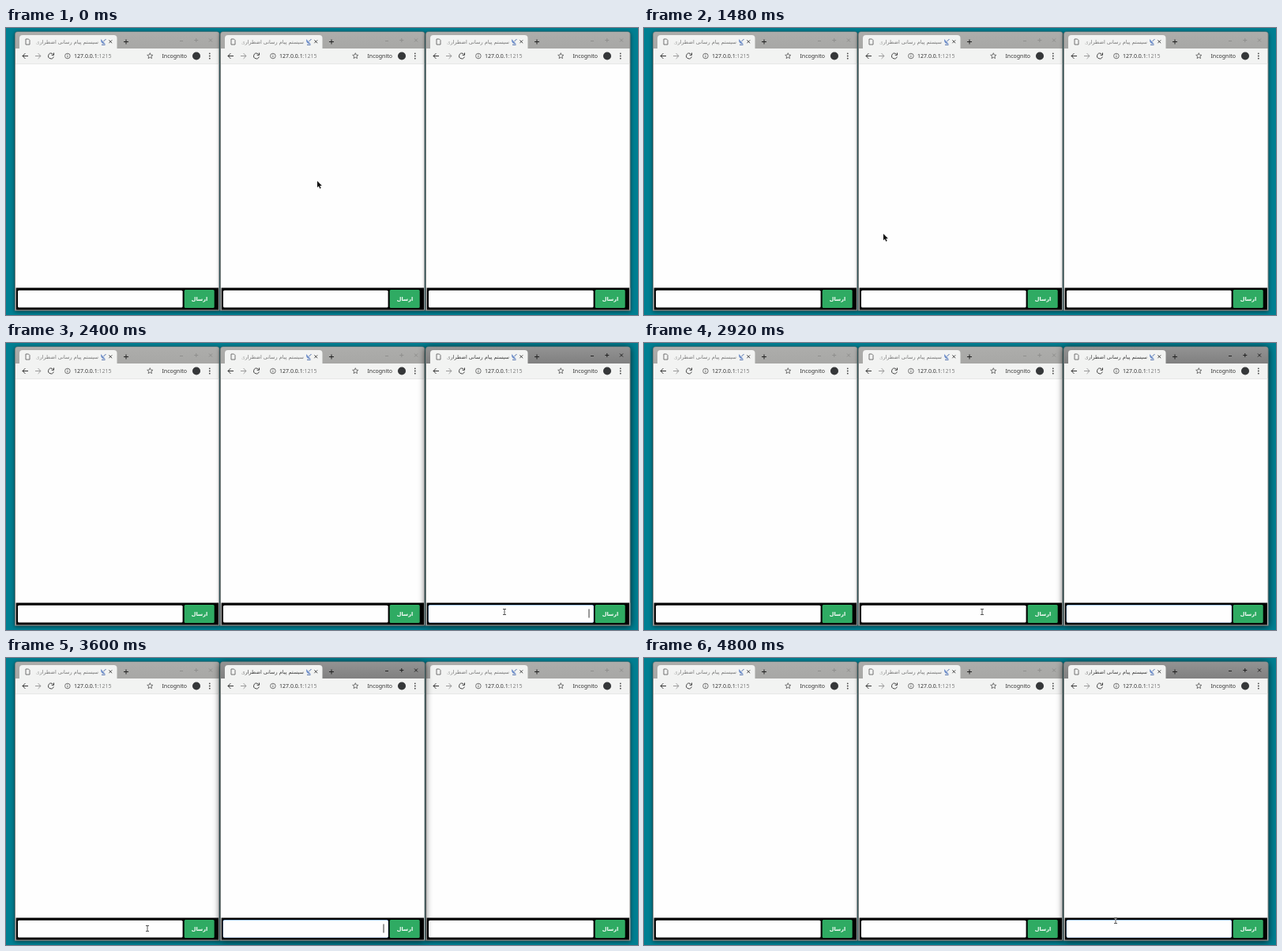
Write an HTML page with a canvas that moves like this. It is 800 by 364 pixels and loops after 5000 ms.

```html
<!DOCTYPE html>
<html lang="fa">
<head>
<meta charset="utf-8">
<style>
html, body { margin: 0; width: 100%; height: 100%; overflow: hidden; background: #007f92; }
canvas { display: block; }
</style>
</head>
<body>
<canvas id="stage" width="800" height="364"></canvas>
<script>
const c = document.getElementById('stage').getContext('2d');
const LATIN = '7px "Noto Sans", "Open Sans", sans-serif';
const PERSIAN = '6.5px "DejaVu Sans", sans-serif';
const CHROME = '#f2f3f2', INK = '#333', PAPER = '#fefefe';
const BLINK = 9;

// Key points of the pointer: step, x, y
const path = [
  [0, 394, 194], [6, 323, 224], [12, 418, 184], [19, 207, 219], [22, 303, 261],
  [27, 631, 309], [30, 631, 341], [36, 631, 341], [45, 421, 341], [48, 421, 341],
  [54, 179, 343], [57, 179, 343], [62, 597, 333], [75, 597, 333]
];
// Clicks that focus a window: step, window
const clicks = [[30, 2], [46, 1], [57, 0], [63, 2]];

function rect(x, y, w, h, fill) {
  c.fillStyle = fill;
  c.fillRect(x, y, w, h);
}

function round(x, y, w, h, r, fill) {
  c.beginPath();
  c.roundRect(x, y, w, h, r);
  c.fillStyle = fill;
  c.fill();
}

function disc(x, y, r, fill) {
  c.beginPath();
  c.arc(x, y, r, 0, 7);
  c.fillStyle = fill;
  c.fill();
}

function stroke(d, color, width = 1) {
  c.strokeStyle = color;
  c.lineWidth = width;
  c.stroke(new Path2D(d));
}

function arc(x, y, r, from, to, color) {
  c.beginPath();
  c.arc(x, y, r, from, to);
  c.strokeStyle = color;
  c.lineWidth = 0.9;
  c.stroke();
}

const plus = (x, y, r, color) =>
  stroke(`M${x - r} ${y}h${2 * r}M${x} ${y - r}v${2 * r}`, color);

const cross = (x, y, r, color) =>
  stroke(`M${x - r} ${y - r}l${2 * r} ${2 * r}m0 ${-2 * r}l${-2 * r} ${2 * r}`, color);

// Arrow pointing left (dir 1) or right (dir -1)
const arrow = (x, y, dir, color) =>
  stroke(`M${x + 7 * dir} ${y}H${x}m${3.4 * dir} -3.4L${x} ${y}l${3.4 * dir} 3.4`, color);

function star(x, y, r) {
  c.beginPath();
  for (let i = 0; i < 10; i++) {
    const a = (i / 5 - 0.5) * Math.PI, d = i % 2 ? r * 0.45 : r;
    c.lineTo(x + d * Math.cos(a), y + d * Math.sin(a));
  }
  c.closePath();
  c.strokeStyle = '#555';
  c.lineWidth = 0.8;
  c.stroke();
}

function text(s, x, y, color, font = LATIN, align = 'left') {
  c.font = font;
  c.fillStyle = color;
  c.textAlign = align;
  c.direction = font === LATIN ? 'ltr' : 'rtl';
  c.fillText(s, x, y);
}

function fade(x0, y0, x1, y1, from, to) {
  const g = c.createLinearGradient(x0, y0, x1, y1);
  g.addColorStop(0, from);
  g.addColorStop(1, to);
  return g;
}

function titleBar(active, awake) {
  const [top, bottom] = active ? ['#939393', '#808080'] : ['#adadab', '#a7a7a5'];
  rect(0, 5, 258, 21, fade(0, 5, 0, 26, top, bottom));
  round(5, 9, 123.5, 18, [4, 4, 0, 0], CHROME);
  stroke('M13 14h3.5l1.5 1.5v5.5h-5z', '#666', 0.9);

  c.save();
  c.beginPath();
  c.rect(24, 9, 82, 17);
  c.clip();
  text('سیستم پیام رسانی اضطراری', 105, 20, awake ? '#3c3c3c' : '#777', PERSIAN, 'right');
  rect(24, 10, 9, 15, fade(24, 0, 33, 0, CHROME, CHROME + '00'));
  c.restore();

  // Satellite dish
  c.fillStyle = '#6f8fca';
  c.fill(new Path2D('M108 14q-.5 6.5 6 6.5z'));
  stroke('M111.5 17l3 -3M109 21.3h4.5', '#4d6ca8');

  cross(120.3, 17.3, 1.9, '#444');
  plus(140, 17.5, 3, '#222');
  const tint = awake ? '#222' : '#8f8f8d';
  stroke('M208 16.5h4', tint);
  plus(228.8, 15.5, 2.5, tint);
  cross(247, 15.5, 2, tint);
}

function toolBar() {
  const y = 35.5;
  rect(0, 26, 258, 19, CHROME);
  rect(0, 45, 258, 0.6, '#d9dad9');
  arrow(9, y, 1, INK);
  arrow(32, y, -1, '#999');
  arc(45, y, 3.4, 0.3, 5.5, INK);
  stroke('M48.5 31.5v2.8h-2.8', INK);
  arc(65.9, y, 3.3, 0, 7, '#666');
  stroke('M65.9 35v2.3M65.9 33.3v1', '#666', 0.9);
  text('127.0.0.1', 74, 38, INK);
  text(':1215', 74 + c.measureText('127.0.0.1').width, 38, '#858585');
  star(170.3, y, 3.8);
  text('Incognito', 185.5, 38, INK);
  disc(229, y, 5, '#353739');
  for (let i = -1; i < 2; i++) disc(245.8, y + 3.2 * i, 0.9, '#444');
}

function messageBar(active, caret) {
  rect(0.6, 329.5, 256.4, 28, '#000');
  if (active) round(2.6, 332, 209.4, 22.8, 2, '#7fb0e6');
  round(3, 332.7, 208.6, 21.7, 1.5, PAPER);
  if (caret) rect(205.4, 337.5, 1.2, 11, '#555');
  round(213.7, 332, 38, 23, 1.5, '#2fab63');
  text('ارسال', 233, 346, '#fff', 'bold ' + PERSIAN, 'center');
}

function drawWindow(i, active, age) {
  c.save();
  c.translate(12 + 260 * i, 0);
  c.shadowColor = active ? 'rgba(0,0,0,.75)' : 'rgba(0,0,0,.55)';
  c.shadowBlur = active ? 8 : 5;
  c.shadowOffsetY = 1;
  round(-1, 4.5, 259.5, 354.3, [4, 4, 0, 0], '#7d807e');
  c.shadowColor = 'transparent';
  c.beginPath();
  c.roundRect(0, 5, 257.5, 353, [3, 3, 0, 0]);
  c.clip();
  rect(0, 45, 258, 312.5, PAPER);
  titleBar(active, active && age > 0);
  toolBar();
  messageBar(active, active && age % (2 * BLINK) < BLINK);
  c.restore();
}

function pointer(k) {
  const n = path.findIndex(p => p[0] > k);
  const [a, x0, y0] = path[n - 1], [b, x1, y1] = path[n];
  const t = (k - a) / (b - a), ease = t * t * (3 - 2 * t);
  c.save();
  c.translate(Math.round(x0 + (x1 - x0) * ease), Math.round(y0 + (y1 - y0) * ease));
  if (k >= 30) {
    const beam = 'M-2 -3.5h4M0 -3.5v7M-2 3.5h4';
    stroke(beam, 'rgba(255,255,255,.7)', 2);
    stroke(beam, '#555');
  } else {
    const shape = 'M0 0v8.3l1.9 -1.7l1.4 3.1l1.4 -.7l-1.4 -3h2.6z';
    stroke(shape, '#fff', 1.2);
    c.fillStyle = '#111';
    c.fill(new Path2D(shape));
  }
  c.restore();
}

function draw(now) {
  // 15 steps per second, snapped to a 40 ms clock
  const k = Math.floor((Math.floor(now % 5000 / 40) + 0.5) * 0.6);
  const [start, focus] = clicks.filter(p => p[0] <= k).pop() || [0, -1];
  // The focused window is drawn last, above its neighbours
  const order = [0, 1, 2].sort((a, b) => (a === focus) - (b === focus));
  rect(0, 0, 800, 364, '#007f92');
  for (const i of order) drawWindow(i, i === focus, k - start);
  pointer(k);
}

const begin = performance.now();
function tick() {
  draw(performance.now() - begin);
  requestAnimationFrame(tick);
}
tick();
</script>
</body>
</html>
```
